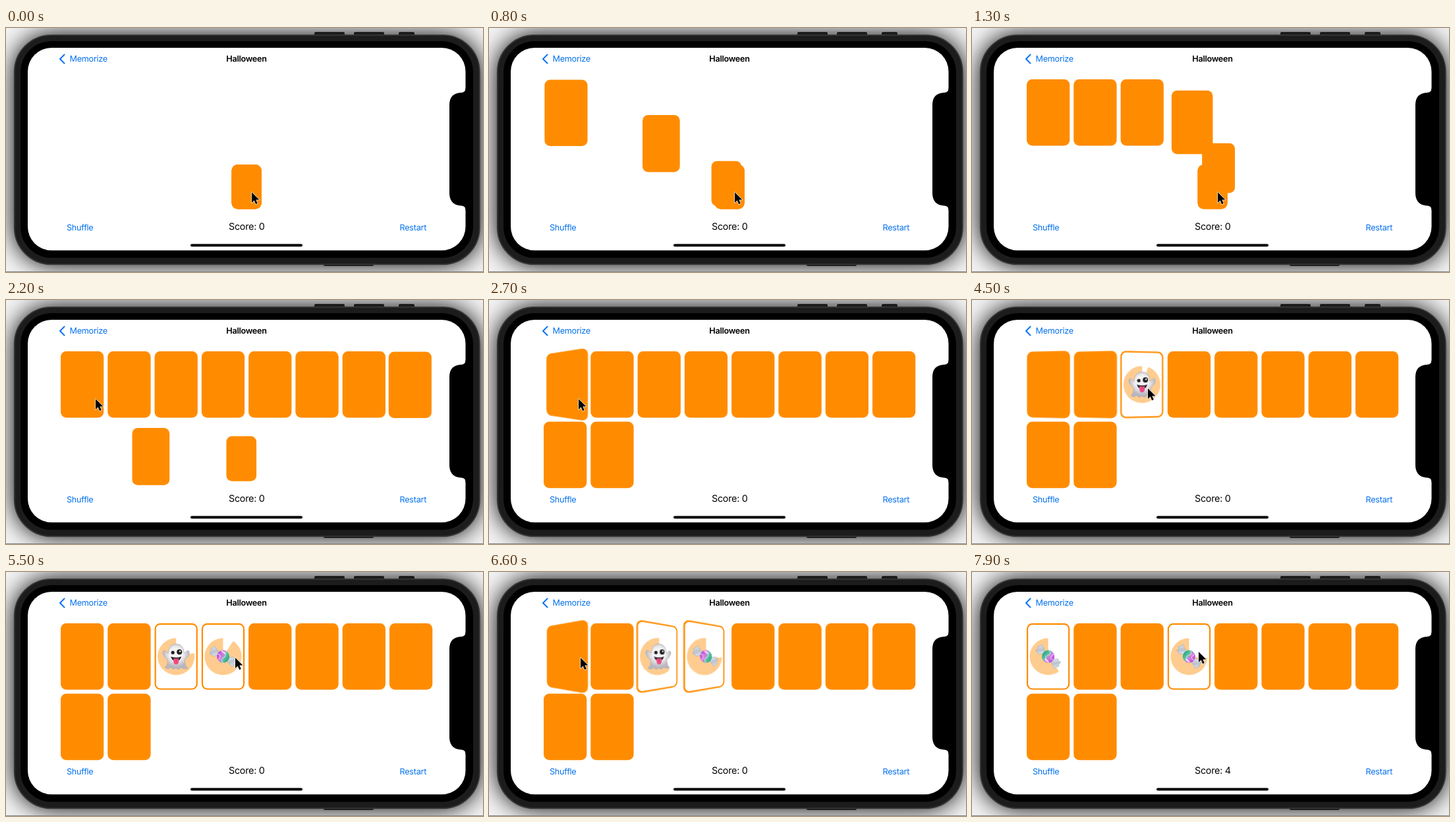
Animation of 724 by 370 pixels, one loop 8000 ms. Source, as an HTML page:

```html
<!DOCTYPE html>
<html lang="en">
<head>
<meta charset="utf-8">
<title>Memory game</title>
<style>
  html, body { margin: 0; width: 100%; height: 100%; overflow: hidden; background: #fff; }
  #stage { position: relative; width: 724px; height: 370px; overflow: hidden; }
  #stage > svg { position: absolute; left: 0; top: 0; }
  text { font: 400 12.7px Inter, "Liberation Sans", sans-serif; letter-spacing: -.3px; fill: #0672ee; text-rendering: geometricPrecision; }
  .title { font-weight: 600; fill: #000; }
  .score { font-size: 14.4px; fill: #000; }
  .card { position: absolute; left: 0; top: 0; width: 0; height: 0; transform-origin: 0 0; }
  .card svg { position: absolute; left: 0; top: 0; overflow: visible; }
  .back { fill: #ff8c00; }
  .edge { fill: #fff; stroke: #ff8c00; stroke-width: 2.2; }
  .pie { fill: #ff8c00; fill-opacity: .44; }
</style>
</head>
<body>
<div id="stage">
  <svg width="724" height="370" viewBox="0 0 724 370">
    <defs>
      <filter id="blur" x="-20%" y="-30%" width="140%" height="160%"><feGaussianBlur stdDeviation="18"/></filter>
      <linearGradient id="wrap" x2="1" y2="1">
        <stop stop-color="#f4f7fb"/><stop offset=".5" stop-color="#b9c3cf"/><stop offset="1" stop-color="#e6ebf1"/>
      </linearGradient>
      <linearGradient id="ball">
        <stop stop-color="#b44fd8"/><stop offset=".42" stop-color="#d879e0"/>
        <stop offset=".6" stop-color="#5cc9a8"/><stop offset="1" stop-color="#2fa37c"/>
      </linearGradient>
      <radialGradient id="sheet" cy=".4">
        <stop offset=".5" stop-color="#f3f2f4"/><stop offset="1" stop-color="#b9b7bf"/>
      </radialGradient>

      <path id="fan" d="M8-2 14-7 17-5 20-6 20-1 22 1 20 4 19 8 15 6 8 3Z" fill="url(#wrap)" stroke="#a3aebb" stroke-width=".6"/>
      <g id="candy">
        <use href="#fan"/><use href="#fan" transform="scale(-1)"/>
        <circle r="9.6" fill="url(#ball)"/>
        <path d="M-7-6C-1-8 4-4 2 0S-2 7 5 8M-9 1C-5-2-2 2-4 8" fill="none" stroke="#eac4f3" stroke-width="1.5" opacity=".8"/>
        <ellipse cx="-2" cy="-6" rx="4" ry="1.6" fill="#fff" opacity=".5"/>
      </g>

      <path id="legs" d="M2-5 7-10 8-20M3-3 12-6 17-15M3 0 12 3 18 12M3 2 8 8 10 21" fill="none" stroke="#30292c" stroke-width="1.8" stroke-linejoin="round" stroke-linecap="round"/>
      <g id="spider">
        <use href="#legs"/><use href="#legs" transform="scale(-1 1)"/>
        <ellipse cy="5" rx="5.2" ry="7.5" fill="#3a3135"/><ellipse cy="-5" rx="4" ry="4.5" fill="#2a2326"/>
        <path d="M-2 2Q0 6 2 2M-2 7Q0 10 2 7" fill="none" stroke="#6d5d62"/>
      </g>

      <g id="ghost">
        <path d="M0-19C8-19 12-13 12-5 14-5 15-9 18-9 22-8 20 0 13 5 13 12 15 15 18 18 12 20 9 17 7 17 4 20 2 20 0 17-3 20-6 20-8 16-11 19-15 19-17 16-13 14-13 10-13 5-20 0-22-8-18-9-15-9-14-5-12-5-12-13-8-19 0-19Z" fill="url(#sheet)" stroke="#aaa8b0" stroke-width=".7"/>
        <circle cx="-5" cy="-6" r="2.6" fill="#222"/>
        <circle cx="5" cy="-7" r="4" fill="#222"/><circle cx="6" cy="-8" r="1.3" fill="#eee"/>
        <path d="M-8 0Q0 3 8 0 6 7 0 7-6 7-8 0Z" fill="#262226"/>
        <path d="M-4 3H4V7Q4 12 0 12-4 12-4 7Z" fill="#ef4f86"/><path d="M0 4V8" stroke="#c23465"/>
      </g>
    </defs>

    <rect width="724" height="370" fill="#f4f4f4"/>
    <rect x="12" y="10" width="708" height="349" rx="58" filter="url(#blur)"/>
    <path d="M0 369.5H724" stroke="#858585"/>
    <g fill="#1c1c1c">
      <rect x="468" y="6" width="46" height="8" rx="2"/><rect x="528" y="6" width="46" height="8" rx="2"/>
      <rect x="596" y="6" width="24" height="8" rx="2"/><rect x="482" y="353" width="76" height="8" rx="2"/>
    </g>
    <rect x="12.8" y="10.8" width="706" height="347.6" rx="56" fill="#1c1c1c" stroke="#363636" stroke-width="1.8"/>
    <rect x="22" y="20" width="687" height="328.5" rx="47"/>
    <rect x="33" y="30" width="664.5" height="307.3" rx="36" fill="#fff"/>
    <path d="M698 91.5H697.5Q697.5 98 691 98 673 98.500 673 117V250Q673 268.500 691 269.500 697.5 269.500 697.5 276H698Z"/>
    <rect x="280" y="327.500" width="170" height="4" rx="2"/>
    <path d="M88.600 40.400 82 47 88.600 53.600" fill="none" stroke="#0672ee" stroke-width="2" stroke-linecap="round" stroke-linejoin="round"/>
    <text x="96.500" y="51.300">Memorize</text>
    <text x="365" y="51.300" text-anchor="middle" class="title">Halloween</text>
    <text x="92" y="306.500">Shuffle</text>
    <text x="638" y="306.500" text-anchor="end">Restart</text>
    <text x="338" y="306.300" class="score">Score: <tspan id="score">0</tspan></text>
  </svg>
  <div id="cards"></div>
  <svg width="724" height="370" viewBox="0 0 724 370">
    <path id="cursor" d="M0 0V16L3.700 12.600 6.200 18.300 8.800 17.100 6.400 11.600H11.500Z" stroke="#fff" stroke-width="1.300" stroke-linejoin="round" paint-order="stroke"/>
  </svg>
</div>
<script>
const LOOP = 8000, STEP = 100;
const DEAL = { start: 326, gap: 200, time: 500 };
const FLIP = 350, MATCH = 7365, SPIN = 1000, BONUS = 6000;
const W = 65.3, H = 100.8, R = 8.5;
const DECK = { x: 365.1, y: 240.9, w: 44.7, h: 66.8 };

// Times at which each card turns over, starting face down.
const faces = [
  { art: 'candy', turns: [2625, 4180, 6520], matched: true },
  { art: 'spider', turns: [3168, 4180] },
  { art: 'ghost', turns: [4180, 6520] },
  { art: 'candy', turns: [4950, 6520, 7365], matched: true }
];

// Pointer moves: start, end, x, y
const moves = [
  [0, 1, 373, 249], [1500, 2100, 136, 150], [2750, 3100, 183, 130],
  [3650, 4130, 267, 134], [4600, 4920, 348, 130], [5850, 6450, 139, 130], [6750, 7280, 344, 121]
];

const $ = id => document.getElementById(id);
const clamp = v => Math.min(1, Math.max(0, v));
const mix = (a, b, p) => a + (b - a) * p;

// Cubic ease-in-out (.42, 0, .58, 1)
function ease(v) {
  v = clamp(v);
  let lo = 0, hi = 1, s = .5;
  for (let i = 0; i < 24; i++) {
    s = (lo + hi) / 2;
    const x = 1.26 * s * (1 - s) ** 2 + 1.74 * s * s * (1 - s) + s ** 3;
    if (x < v) lo = s; else hi = s;
  }
  return s * s * (3 - 2 * s);
}

function makeCard(i) {
  const face = faces[i], el = document.createElement('div');
  el.className = 'card';
  const front = face ? `<g class="front">
    <rect class="edge" x="${-W / 2 + 1.1}" y="${-H / 2 + 1.1}" width="${W - 2.2}" height="${H - 2.2}" rx="${R - 1.1}"/>
    <path class="pie"/><use class="art" href="#${face.art}"/></g>` : '';
  el.innerHTML = `<svg width="1" height="1">${front}
    <rect class="back" x="${-W / 2}" y="${-H / 2}" width="${W}" height="${H}"/></svg>`;
  $('cards').append(el);
  const find = name => el.querySelector('.' + name);
  return {
    el, face, x: 115.65 + i % 8 * 71.28, y: 128.2 + Math.floor(i / 8) * 106.7, start: DEAL.start + i * DEAL.gap,
    front: find('front'), back: find('back'), pie: find('pie'), art: find('art')
  };
}
const cards = Array.from({ length: 10 }, (_, i) => makeCard(i));

function angleAt(turns, t) {
  const done = turns.filter(v => v <= t);
  if (!done.length) return 180;
  const p = ease((t - done[done.length - 1]) / FLIP);
  return 180 * (done.length % 2 ? 1 - p : p);
}

function timeUp({ turns, matched }, t) {
  const end = matched ? Math.min(t, MATCH) : t;
  let sum = 0;
  for (let i = 0; i < turns.length; i += 2)
    sum += Math.max(0, Math.min(end, turns[i + 1] ?? Infinity) - turns[i]);
  return sum;
}

function piePath(gap, r = 28) {
  const a = gap * 2 * Math.PI;
  return `M0 0L${r * Math.sin(a)} ${-r * Math.cos(a)}A${r} ${r} 0 ${gap < .5 ? 1 : 0} 1 -.01 ${-r}Z`;
}

function drawCard(c, t) {
  const p = ease((t - c.start) / DEAL.time);
  const sx = mix(DECK.w / W, 1, p), sy = mix(DECK.h / H, 1, p);
  let pose = `translate(${mix(DECK.x, c.x, p)}px,${mix(DECK.y, c.y, p)}px) scale(${sx},${sy})`;
  c.back.setAttribute('rx', R / sx);
  c.back.setAttribute('ry', R / sy);
  if (c.face) {
    const angle = angleAt(c.face.turns, t), up = angle < 90;
    if (angle > .01 && angle < 179.99) pose += ` perspective(${H}px) rotateY(${angle}deg)`;
    c.front.style.display = up ? '' : 'none';
    c.back.style.display = up ? 'none' : '';
    if (up) {
      const spin = c.face.matched ? Math.max(0, t - MATCH) / SPIN * 360 : 0;
      c.pie.setAttribute('d', piePath(timeUp(c.face, t) / BONUS));
      c.art.setAttribute('transform', `rotate(${(c.face.art === 'candy' ? 28 : 0) + spin})`);
    }
  }
  c.el.style.transform = pose;
}

function drawCursor(t) {
  let [, , x, y] = moves[0];
  for (const [from, to, nx, ny] of moves) {
    const p = ease((t - from) / (to - from));
    x = mix(x, nx, p);
    y = mix(y, ny, p);
  }
  $('cursor').setAttribute('transform', `translate(${x} ${y})`);
}

function draw(now) {
  const t = Math.floor(now % LOOP / STEP) * STEP;
  cards.forEach(c => drawCard(c, t));
  drawCursor(t);
  $('score').textContent = t < MATCH ? 0 : 4;
}

let begin;
function tick(now) {
  begin ??= now;
  draw(now - begin);
  requestAnimationFrame(tick);
}
draw(0);
requestAnimationFrame(tick);
</script>
</body>
</html>
```
